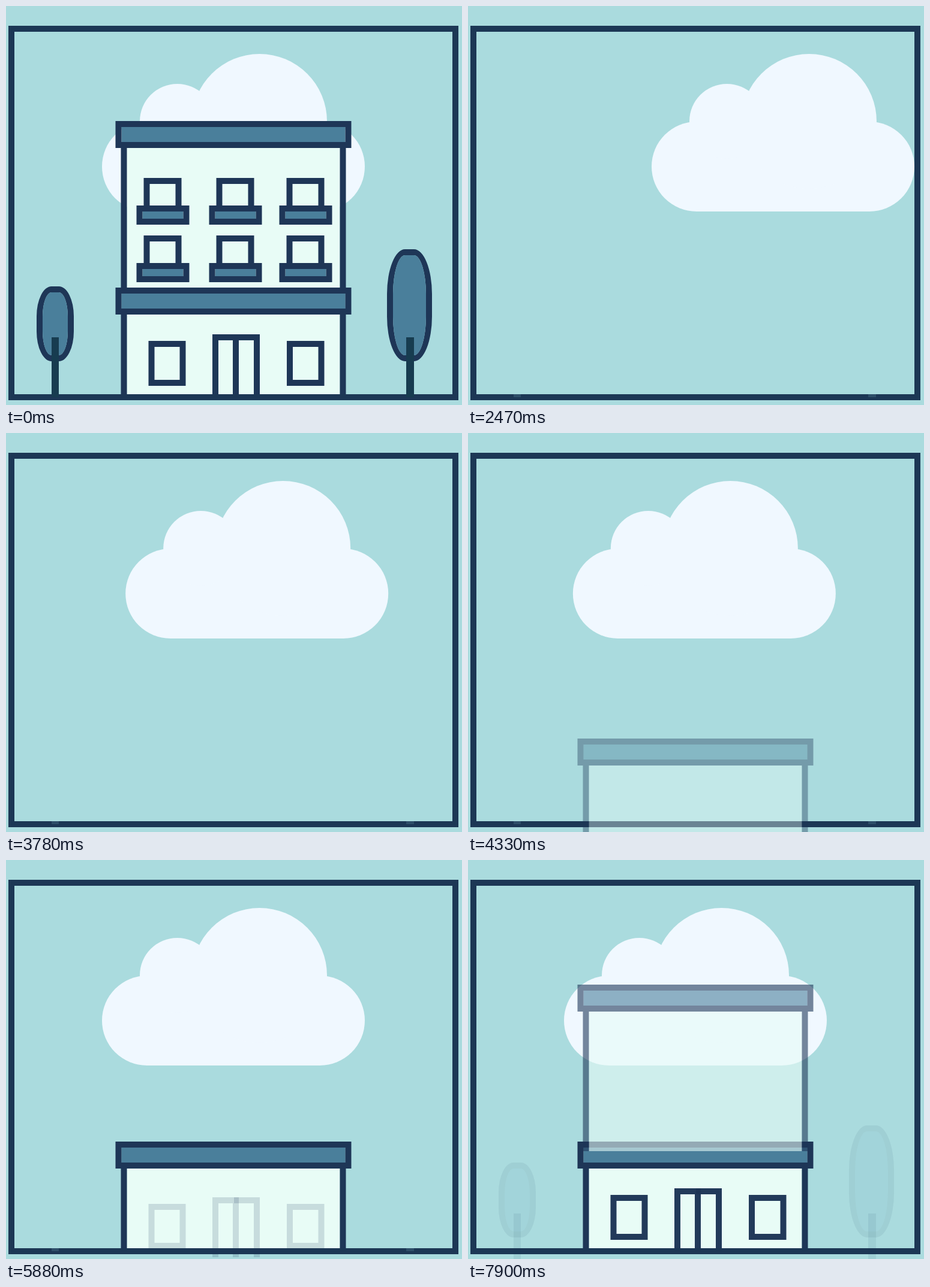
Recreate the animation shown at these times as an HTML page with a canvas. Size 760 by 666 pixels, loop 7990 ms.

```html
<!DOCTYPE html>
<html lang="en">
<head>
<meta charset="utf-8">
<title>House</title>
<style>
html, body { margin: 0; width: 100%; height: 100%; overflow: hidden; background: #aadbde; }
canvas { display: block; }
</style>
</head>
<body>
<canvas id="stage" width="760" height="666"></canvas>
<script>
const ctx = document.getElementById('stage').getContext('2d');
const LOOP = 7990, BUILD = 2470;
const SKY = '#aadbde', FRAME = '#1c3755', DARK = '#1e3657', BLUE = '#4a7f9b',
      CREAM = '#e8fcf6', CLOUD = '#f0f8ff', STEM = '#173c50', STUB = '#2e4e69';

// cubic-bezier(.25, .1, .25, 1)
function ease(x) {
  if (x <= 0) return 0;
  if (x >= 1) return 1;
  let lo = 0, hi = 1;
  for (let i = 0; i < 24; i++) {
    const s = (lo + hi) / 2;
    if (.75 * s * (1 - s) + s ** 3 < x) lo = s; else hi = s;
  }
  return .3 * lo * (1 - lo) ** 2 + 3 * lo * lo * (1 - lo) + lo ** 3;
}

function rect(x, y, w, h, color) {
  ctx.fillStyle = color;
  ctx.fillRect(x, y, w, h);
}

function box(x, y, w, h, fill, line = DARK) {
  if (fill) rect(x + 10, y + 10, w - 20, h - 20, fill);
  ctx.strokeStyle = line;
  ctx.lineWidth = 10;
  ctx.strokeRect(x + 5, y + 5, w - 10, h - 10);
}

// Fades a part in while it rises into place
function rise(p, distance, draw) {
  if (p <= 0) return;
  ctx.save();
  ctx.globalAlpha = p;
  ctx.translate(0, Math.round(distance * (1 - p)));
  draw();
  ctx.restore();
}

function cloud(dx) {
  ctx.fillStyle = CLOUD;
  ctx.beginPath();
  ctx.roundRect(160 + dx, 193, 438, 150, 75);
  ctx.fill();
  for (const [x, r] of [[285.5, 62.5], [422.5, 112.5]]) {
    ctx.beginPath();
    ctx.arc(x + dx, 192.5, r, 0, 7);
    ctx.fill();
  }
}

function storey(top, bottom) {
  const y = top + 45, h = bottom - y;
  rect(201.5, y, 355, h, CREAM);
  rect(191.5, y, 10, h, DARK);
  rect(556.5, y, 10, h, DARK);
  box(182.5, top, 393, 45, BLUE);
}

function entrance() {
  box(237.5, 559, 62, 75);
  box(468, 559, 62.5, 75);
  rect(344, 548, 79, 10, DARK);
  for (const x of [344, 378, 413]) rect(x, 558, 10, 90, DARK);
  rect(380, 548, 8, 10, DARK);
}

function balconies() {
  for (const y of [287, 383])
    for (const x of [217.5, 338.5, 455.5]) {
      box(x + 12, y, 63, 60);
      box(x, y + 46, 88, 32, BLUE);
    }
}

function oval(x, y, w, h, rx, ry) {
  ctx.roundRect(x, y, w, h, { x: rx, y: ry });
}

function tree(x, y, w, h, stemX, stemW) {
  const rx = w * .4, ry = h * .4;
  ctx.fillStyle = DARK;
  ctx.beginPath();
  oval(x, y, w, h, rx, ry);
  oval(x + 10, y + 10, w - 20, h - 20, rx - 10, ry - 10);
  ctx.fill('evenodd');
  ctx.fillStyle = BLUE;
  ctx.beginPath();
  oval(x + 10, y + 10, w - 20, h - 20, rx - 10, ry - 10);
  ctx.fill();
  rect(stemX, 553, stemW, 100, STEM);
}

function trees() {
  tree(51, 468, 62, 125, 76, 12);
  tree(635, 406, 75, 187, 667, 13);
}

function render(now) {
  const t = now % LOOP, done = t < BUILD;
  const progress = (delay, length) => done ? 1 : ease((t - BUILD - delay) / length);

  rect(0, 0, 760, 666, SKY);
  box(4, 33, 750, 625, null, FRAME);
  if (!done && t < 7470) {
    rect(76, 648, 12, 5, STUB);
    rect(667, 648, 13, 5, STUB);
  }
  cloud(146 * (1 - progress(0, 3000)));
  rise(progress(1550, 1300), 64, () => storey(470, 648));
  rise(progress(3000, 3000), 18, entrance);
  rise(progress(4000, 4200), 38.3, () => storey(192, 470));
  if (done) balconies();
  rise(progress(5000, 5000), 39.5, trees);
  requestAnimationFrame(frame);
}

let start;
function frame(now) {
  start ??= now;
  render(now - start);
}
requestAnimationFrame(frame);
</script>
</body>
</html>
```
